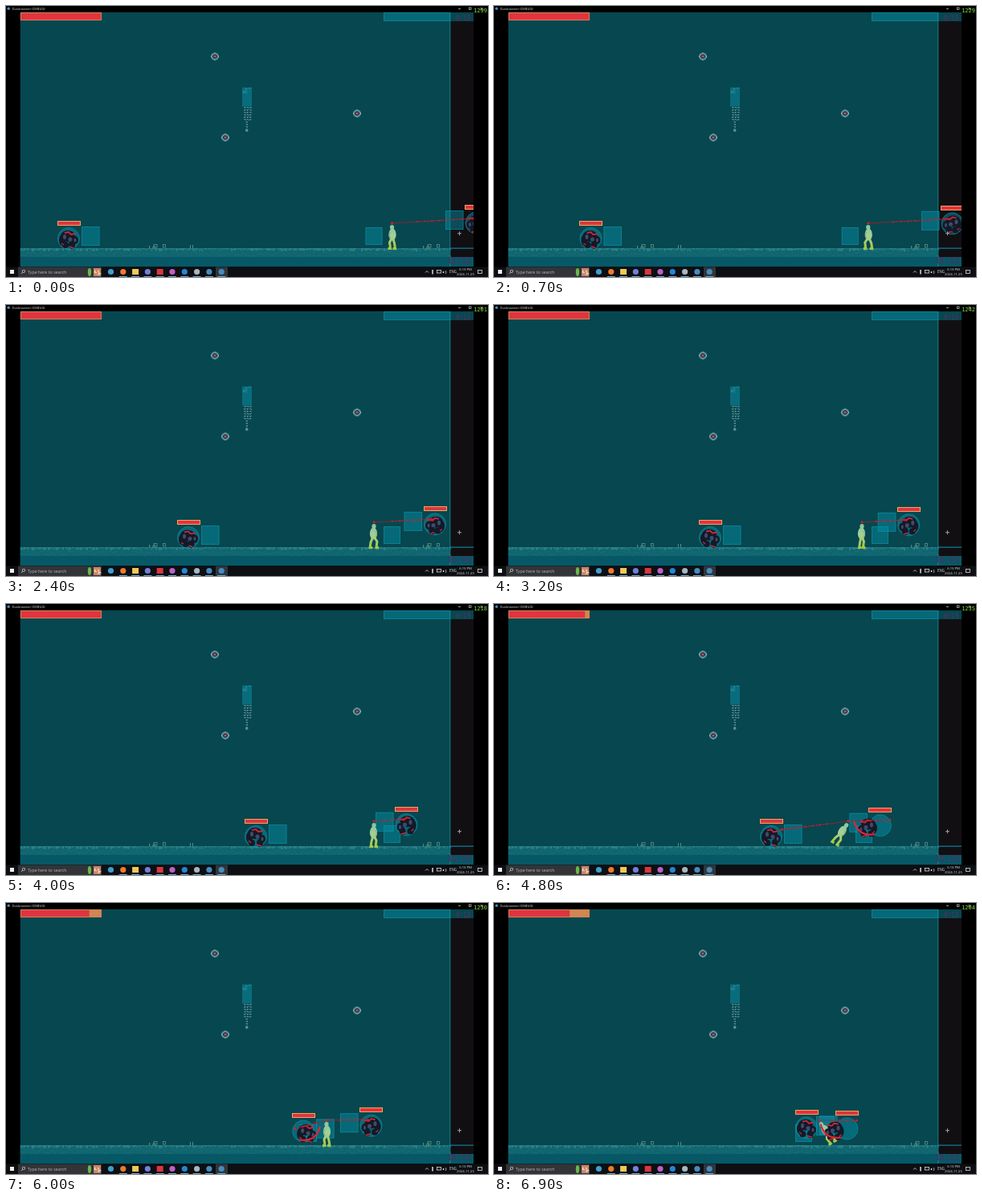
Write an HTML page with a canvas that moves like this. It is 600 by 338 pixels and loops after 7 s.

```html
<!DOCTYPE html>
<html lang="en">
<head>
<meta charset="utf-8">
<title>Debug scene</title>
<style>
html, body { margin: 0; width: 100%; height: 100%; overflow: hidden; background: #000; }
canvas, svg { position: absolute; left: 0; top: 0; width: 600px; height: 338px; }
text { font-family: "Open Sans", sans-serif; fill: #e4e4e4; }
.hint { fill: #b9b9b9; }
.num { font-family: "DejaVu Sans Mono", monospace; font-weight: bold; fill: #44365c; }
.rate { font-family: "DejaVu Sans Mono", monospace; fill: #86e33c; }
.end { text-anchor: end; }
.mid { text-anchor: middle; }
</style>
</head>
<body>
<canvas id="stage" width="600" height="338"></canvas>
<svg viewBox="0 0 600 338">
  <text x="7.5" y="5" font-size="4.1">Duskroamer (DEBUG)</text>
  <text class="hint" x="27" y="333.6" font-size="5.3">Type here to search</text>
  <text x="552" y="333" font-size="4.4">ENG</text>
  <text class="mid" x="572" y="330.4" font-size="4.2">6:13 PM</text>
  <text class="mid" x="572" y="336.4" font-size="4.2">2024-11-25</text>
  <text class="num end" x="579" y="18" font-size="8">0/15</text>
  <text class="num end" x="579" y="321" font-size="10">15/15</text>
  <text id="fps" class="rate end" x="599" y="8" font-size="7"></text>
</svg>
<script>
const LOOP = 7, STEP = .1;
const ctx = document.getElementById('stage').getContext('2d');
const fps = document.getElementById('fps');

// horizontal paths: seconds, x
const LEFT_FOE = [[0, 78], [1.4, 163], [2.4, 227], [4, 311], [4.8, 345], [6.9, 389]];
const RIGHT_FOE = [[0, 585.5], [2.4, 534], [4, 498.5], [6, 454.5], [6.9, 439.5]];
const PLAYER = [[0, 480.5], [1.4, 451], [2.4, 458], [4, 458], [4.8, 438], [6, 399], [6.9, 408]];

function along(path, t) {
  const i = path.findIndex(p => p[0] > t);
  if (i < 0) return path[path.length - 1][1];
  const [t0, x0] = path[i - 1], [t1, x1] = path[i];
  return x0 + (x1 - x0) * (t - t0) / (t1 - t0);
}
const after = (t, from) => Math.max(0, t - from);
const near = (t, mid, span) => Math.abs(t - mid) < span;
const pulse = (t, mid) => Math.max(0, Math.min(1, 2 - Math.abs(t - mid) / .2));
const noise = n => { const v = Math.sin(n * 127.1 + 3.7) * 43758.5453; return v - Math.floor(v); };

function rect(x, y, w, h, fill) { ctx.fillStyle = fill; ctx.fillRect(x, y, w, h); }
function box(x, y, w, h, color, width = 1) {
  ctx.strokeStyle = color;
  ctx.lineWidth = width;
  ctx.strokeRect(x, y, w, h);
}
function blob(x, y, rx, ry, fill) {
  ctx.fillStyle = fill;
  ctx.beginPath();
  ctx.ellipse(x, y, rx, ry, 0, 0, 7);
  ctx.fill();
}
function line(points, color, width = 1) {
  ctx.strokeStyle = color;
  ctx.lineWidth = width;
  ctx.beginPath();
  points.forEach(([x, y]) => ctx.lineTo(x, y));
  ctx.stroke();
}
function zone(x, y, w, h) {
  rect(x, y, w, h, 'rgba(4,142,165,.48)');
  box(x + .5, y + .5, w - 1, h - 1, 'rgba(18,150,172,.5)');
}
function bar(x, y, w, h, filled, edge) {
  rect(x, y, w, h, edge);
  rect(x + 1, y + 1, w - 2, h - 2, '#cf8753');
  rect(x + 1, y + 1, filled - 2, h - 2, '#e1343f');
}

function orb(x, y) {
  blob(x, y, 5.2, 4.8, '#3f7d88');
  line([[x - 5, y], [x, y - 4.5], [x + 5, y], [x, y + 4.5], [x - 5, y]], '#8fb3b8');
  blob(x, y, 3, 2.7, '#35384c');
  blob(x, y, 1.6, 1.3, '#b8505c');
}

// small broken strokes scattered over an area
function scraps(x, y, w, h, count, seed, color) {
  for (let i = 0; i < count; i++) {
    const n = seed + i * 3;
    const long = noise(n) > .5;
    rect(x + noise(n + 1) * w, y + noise(n + 2) * h, long ? 3 : 1, long ? 1 : 2, color);
  }
}
function plants(x) {
  scraps(x, 299, 8, 2, 5, 4, '#5d8f84');
  box(x + 6, 297.5, 4, 3.5, '#5d8f84', .8);
  box(x + 17.5, 297.5, 3, 3.5, '#5d8f84', .8);
}

function ground() {
  rect(17.5, 302, 535, 11, '#10656f');
  for (let x = 18; x < 553; x += 2) {
    rect(x, 302, 2, 1 + noise(x) * 3, noise(x + 900) > .45 ? '#2b8087' : '#1d747c');
    rect(x, 306 + noise(x + 40) * 6, 2, 1, '#176f78');
  }
  rect(17.5, 313, 564.5, 12, '#075867');
}

function scenery() {
  rect(17.5, 7.5, 535, 318, '#07474f');
  rect(553, 7.5, 29, 318, '#120f13');
  ground();
  rect(553, 8, 29, 11, '#07474f');
  zone(470, 8, 83, 11);
  rect(552.3, 8, 1, 317, '#138a9a');
  rect(553, 301.5, 29, 1.3, '#0a7b8f');
  rect(294, 101.5, 12, 24, '#086c7d');
  scraps(294, 102, 9, 6, 9, 20, '#258b96');
  for (let y = 126; y < 152; y += 3) {
    const half = y < 142 ? 4 : 1.5;
    for (let x = 300 - half; x < 300 + half; x += 3.5) {
      rect(x, y, 2.5, 1, '#568a92');
      rect(x + noise(x + y) * 2, y + 1, 1, 1, '#568a92');
    }
  }
  blob(299.7, 155, 1.8, 2, '#5b8d95');
  plants(178);
  plants(519);
  rect(229, 298, 1, 4, '#508b86');
  rect(232, 298, 1, 4, '#508b86');
  orb(260, 63);
  orb(437, 134);
  orb(273, 164);
}

function player(x, lean, face, t) {
  const stride = 1 + Math.sin(t * 11);
  ctx.save();
  ctx.translate(x, 277);
  ctx.rotate(lean);
  ctx.scale(face, 1);
  const skin = ctx.createLinearGradient(0, -4, 0, 26);
  skin.addColorStop(0, '#86c4a0');
  skin.addColorStop(.45, '#a4d09a');
  skin.addColorStop(1, '#a5c83f');
  blob(0, -1, 2.6, 3, skin);
  blob(-.5, 8, 4.6, 7.5, skin);
  line([[-1, 12], [-2 - stride, 19], [-3 - stride, 25.5], [0 - stride, 25.5]], skin, 3);
  line([[0, 12], [2 + stride, 18], [1 + stride, 25.5], [4 + stride, 25.5]], skin, 3);
  line([[2, 5], [3.5, 9], [2, 13]], '#87ad72');
  ctx.restore();
}

function foe(x, y, face, t, lunge) {
  const bob = Math.sin(t * 9);
  blob(x, y, 13.5, 13.5, 'rgba(4,142,165,.5)');
  ctx.strokeStyle = 'rgba(15,148,170,.6)';
  ctx.lineWidth = 1;
  ctx.stroke();
  ctx.save();
  ctx.translate(x + lunge * face, y + (lunge ? 2 : 0));
  ctx.scale(face, 1);
  const dark = '#161826', steel = '#3f4b6c', red = '#c52b3d';
  blob(-1, -3 + bob, 9, 7, dark);
  blob(-8, 2 + bob, 4, 7, dark);
  blob(8, 2 - bob, 4, 5, dark);
  blob(-4 + bob, 8, 4, 4, dark);
  blob(4 - bob, 8, 4, 5, dark);
  blob(-5, -2 + bob, 2, 3, steel);
  blob(2, 1 + bob, 2.5, 2.5, steel);
  blob(8, 2 - bob, 1.5, 2.5, steel);
  line([[-5, -7 + bob], [0, -8 + bob], [3, -5 + bob], [9, -6 + bob]], red, 1.8);
  line([[1, 10], [6 - bob, 12]], red, 1.6);
  line([[-9, 6 + bob], [-6, 8]], red, 1.2);
  if (lunge) {
    ctx.strokeStyle = '#dd2638';
    ctx.lineWidth = 2.2;
    ctx.beginPath();
    ctx.moveTo(-9, 9);
    ctx.quadraticCurveTo(12, 12, 17, -8);
    ctx.stroke();
  }
  ctx.restore();
  bar(Math.round(x - 14.5), Math.round(y - 22.5), 29, 6, 29, '#efa65c');
}

function ray(x, y, ex, ey) {
  line([[x, y], [ex, ey]], 'rgba(205,20,35,.65)');
  ctx.setLineDash([3, 2, 1, 3]);
  line([[x + (ex - x) * .3, y + (ey - y) * .3], [ex, ey]], '#d91a2c', 1.2);
  ctx.setLineDash([]);
  blob(ex, ey, 1.4, 1.4, '#d51c2d');
}

function tray() {
  const pale = '#ddd';
  line([[522, 332.5], [524, 330.5], [526, 332.5]], pale, .8);
  line([[531, 329], [531, 334.5]], pale, 1.5);
  box(536.5, 329.5, 5, 3.5, pale, .8);
  line([[544.5, 331], [544.5, 333]], pale, 1.5);
  line([[547, 330], [548, 332], [547, 334]], pale, .7);
  box(587.5, 329.5, 5, 4, pale, .8);
}

function desktop() {
  rect(0, 0, 600, 338, '#000');
  blob(3.2, 3.3, 1.7, 1.7, '#478cbf');
  rect(563, 3, 3, .7, '#ccc');
  box(576.5, 2, 2.5, 2.5, '#ccc', .7);
  line([[590.5, 2], [593.5, 5]], '#ccc', .7);
  line([[593.5, 2], [590.5, 5]], '#ccc', .7);

  rect(0, 325.5, 600, 12.5, '#0d0f12');
  rect(5, 329, 5, 5, '#eee');
  rect(15, 325.5, 104, 12.5, '#323437');
  blob(22, 330.7, 2, 2, '#ccc');
  blob(22, 330.7, 1.2, 1.2, '#323437');
  line([[20.8, 332], [19, 334]], '#ccc', .8);
  blob(104, 332, 2.2, 5, '#69b84b');
  rect(109, 327, 9, 10, '#c98468');
  scraps(109, 328, 7, 7, 8, 60, '#efe2cf');
  rect(261, 325.5, 15, 12.5, '#30363c');
  const apps = ['#3c9fd0', '#f2792d', '#f2c958', '#7180dc', '#dc3540', '#c05fc8', '#2686d5', '#aab6bd', '#478cbf', '#478cbf'];
  apps.forEach((color, i) => {
    const x = 130.5 + i * 15.3;
    if (i === 2 || i === 4) rect(x - 4, 328, 8, 7, color);
    else blob(x, 331.5, 3.6, 3.6, color);
    if (i) rect(x - 5, 337, 10, 1, '#6aa6d1');
  });
  tray();
}

function draw(t) {
  const ax = along(LEFT_FOE, t), ay = 290 - 4.6 * after(t, 4.8);
  const bx = along(RIGHT_FOE, t), by = 270.5 + 1.2 * t + 3 * after(t, 6);
  const px = along(PLAYER, t);
  const lean = .55 * (pulse(t, 4.8) - pulse(t, 6.9));
  const face = t > 1.55 && t < 5.15 ? 1 : -1;
  const leftLunge = near(t, 6, .25) ? 4 : 0;
  const rightLunge = near(t, 4.8, .25) || t > 6.55 ? 16 : 0;
  const hits = Math.floor(after(t, 4.05) / .55);

  desktop();
  ctx.save();
  ctx.beginPath();
  ctx.rect(17.5, 7.5, 564.5, 318);
  ctx.clip();
  scenery();
  bar(18, 8, 101, 10, 101 - 4.75 * hits, '#d5804f');
  zone(face > 0 ? px + 12 : px - 33, 276, 21, 22);
  zone(ax + 16, ay - 15, 22.5, 24);
  zone(bx - 38.5, by - 15.5, 22.5, 24);
  player(px, lean, face, t);
  foe(ax, ay, 1, t, leftLunge);
  foe(bx, by, -1, t, rightLunge);
  const head = px + lean * 5;
  ray(head, 271, bx - 4 + rightLunge, 265 + .9 * t);
  if (near(t, 5.35, 1.05)) ray(head, 271, Math.min(ax + 13, 360), 281.5);
  blob(head, 270.8, 1.5, 1.5, '#e0182c');
  line([[562, 283.7], [567, 283.7]], '#a7c5c8', .8);
  line([[564.5, 281.2], [564.5, 286.2]], '#a7c5c8', .8);
  ctx.restore();
  fps.textContent = Math.floor(1180 + 65 * noise(t * 10) + 110 * Math.exp(-2 * t));
}

const start = performance.now();
function frame() {
  const t = (performance.now() - start) / 1000 % LOOP;
  draw(Math.floor(t / STEP) * STEP);
  requestAnimationFrame(frame);
}
frame();
</script>
</body>
</html>
```
